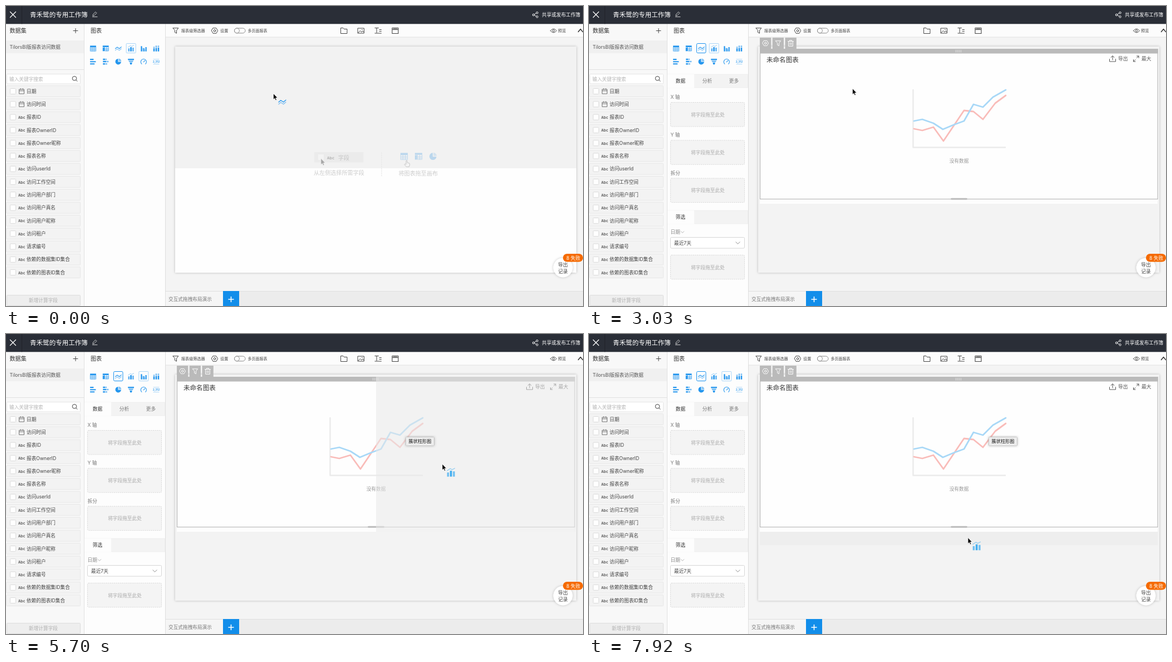
An HTML page for the animation above (8 s loop, 1037 by 540 pixels).

```html
<!DOCTYPE html>
<html lang="zh">
<head>
<meta charset="utf-8">
<title>拖拽布局演示</title>
<style>
html, body { margin: 0; width: 100%; height: 100%; overflow: hidden; background: #f4f4f4; }
svg { display: block; width: 100vw; height: 100vh; }
text { font-family: Inter, "Noto Sans CJK SC", "Noto Sans CJK", sans-serif; white-space: pre; }
.mono { font-family: "Noto Sans Mono", monospace; font-weight: 600; }
.line { fill: none; stroke: currentColor; stroke-linecap: round; stroke-linejoin: round; }
.blue { color: #2496ee; }
.pale { color: #84c1f2; }
</style>
</head>
<body>
<svg id="stage" viewBox="0 0 1037 540" preserveAspectRatio="none">
  <defs>
    <filter id="soft" x="-20%" y="-20%" width="140%" height="140%">
      <feDropShadow dx="0" dy="0" stdDeviation="2" flood-opacity=".25"/>
    </filter>
    <g id="table">
      <path fill="currentColor" d="M-6-5.5H6V-2H-6Z"/>
      <path class="line" stroke-width=".8" d="M-5.6-2V5.5H5.6V-2M-5.6 .5H5.6M-5.6 3H5.6M-2-2V5.5M2-2V5.5"/>
    </g>
    <g id="pivot">
      <path fill="currentColor" d="M-6-5.5H6V-2.6H-6ZM-6-1.8H-2.6V5.5H-6Z"/>
      <path class="line" stroke-width=".8" d="M-2-2V5.2H5.6V-2M-2 .5H5.6M-2 3H5.6M2-2V5.2"/>
    </g>
    <g id="waves">
      <path class="line" stroke-width="1.2" d="M-6 .5L-2.5-2.5 2 .5 6-3"/>
      <path class="line" stroke-width="1.2" opacity=".55" d="M-6 4L-2.5 1 2 4 6 .5"/>
    </g>
    <g id="combo">
      <path fill="currentColor" opacity=".75" d="M-5.6 0H-2.8V6H-5.6ZM2.8-1.5H5.6V6H2.8Z"/>
      <path fill="currentColor" d="M-1.5-2.5H1.5V6H-1.5Z"/>
      <path class="line" stroke-width=".9" opacity=".6" d="M-5.5-2.5L-1-5.5 1.5-4 5.5-6"/>
    </g>
    <g id="bars">
      <path fill="currentColor" d="M-5.5-4.5H-3V6H-5.5ZM-.8-.5H1.6V6H-.8ZM3.6-2.5H6V6H3.6Z"/>
      <path fill="currentColor" opacity=".5" d="M-3-1H-1.7V6H-3ZM1.6 2H2.8V6H1.6Z"/>
    </g>
    <g id="stack">
      <path fill="currentColor" d="M-5.8 0H-3V6H-5.8ZM-1.4-1H1.4V6H-1.4ZM3-1.5H5.8V6H3Z"/>
      <path fill="currentColor" opacity=".6" d="M-5.8-3.5H-3V-.7H-5.8ZM-1.4-5.5H1.4V-1.7H-1.4ZM3-5.5H5.8V-2.2H3Z"/>
    </g>
    <g id="rows">
      <path fill="currentColor" d="M-6-5.5H1V-3H-6ZM-6-.8H5.5V1.5H-6ZM-6 3.5H3V5.8H-6Z"/>
    </g>
    <g id="rowstack">
      <path fill="currentColor" d="M-5.5-5.8H-1V-3H-5.5ZM-5.5-1.3H1V1.3H-5.5ZM-5.5 3.2H-1.5V6H-5.5Z"/>
      <path fill="currentColor" opacity=".6" d="M-.4-5.8H2V-3H-.4ZM1.6-1.3H5.8V1.3H1.6ZM-.8 3.2H3V6H-.8Z"/>
    </g>
    <g id="pie">
      <path fill="currentColor" d="M-.5-5.6A5.8 5.8 0 1 0 5.6 .6H-.5Z"/>
      <path fill="currentColor" opacity=".55" d="M.6-6A6 6 0 0 1 6-.6H.6Z"/>
    </g>
    <g id="funnel">
      <path fill="currentColor" d="M-6-5.5H6V-3H-6ZM-2.5 2H2.5L1.5 5.8H-1.5Z"/>
      <path fill="currentColor" opacity=".6" d="M-5.2-2.2H5.2L3.4 1.2H-3.4Z"/>
    </g>
    <g id="gauge">
      <path class="line" stroke-width="1.2" d="M-3.8 4.8A5.6 5.6 0 1 1 3.8 4.8M0 1L2.5-2"/>
    </g>
    <g id="number">
      <path class="line" stroke-width=".7" opacity=".6" d="M-5.5-4.5H5.5M-5.5 5H5.5"/>
      <text y="2.4" font-size="5.4" font-weight="600" text-anchor="middle" fill="currentColor">2,312</text>
    </g>
    <path id="sieve" class="line" d="M-4.8-4.8H4.8L1.5-.5V4.6L-1.5 3V-.5Z"/>
    <g id="gear" class="line">
      <path d="M-2.8-4.8H2.8L5.6 0 2.8 4.8H-2.8L-5.6 0Z"/><circle r="1.9"/>
    </g>
    <path id="arrow" d="M0 0V11L2.5 8.7 4.1 12.4 5.9 11.6 4.3 8H7.6Z"/>
    <path id="down" class="line" d="M-3-1.5L0 1.5 3-1.5"/>
  </defs>
</svg>
<script>
const stage = document.getElementById('stage');
const S = 8.67, M = 10.1, L = 11.56, XS = 7.2;

const box = (x, y, w, h, fill, more = '') =>
  `<rect x="${x}" y="${y}" width="${w}" height="${h}" fill="${fill}" ${more}/>`;
const edge = (c, r = 0) => `stroke="${c}" rx="${r}"`;
const text = (x, cy, str, size, fill, more = '') =>
  `<text x="${x}" y="${cy + size * .37}" font-size="${size}" fill="${fill}" ${more}>${str}</text>`;
const mid = 'text-anchor="middle"';
const path = (d, c, w = 1, more = '') =>
  `<path class="line" d="${d}" style="color:${c}" stroke-width="${w}" ${more}/>`;
const use = (id, x, y, c = '', w = 1, k = 1) =>
  `<use href="#${id}" transform="translate(${x} ${y}) scale(${k})" style="color:${c}" stroke-width="${w}"/>`;
const group = (id, body, more = '') => `<g id="${id}" ${more}>${body}</g>`;

function header() {
  return box(0, 0, 1037, 32.3, '#2a2e37') + box(28, 0, 1, 32.3, '#20232a') +
    path('M7.5 10.5L17.5 20.5M17.5 10.5L7.5 20.5', '#fff', 1.3) +
    text(43, 15.8, '青禾鹭的专用工作簿', L, '#fff') +
    path('M156 17.5L156.6 14.8 161 10.6 163 12.6 158.7 16.9ZM155.5 19.5H164', '#ddd', .9) +
    path('M953.5 12.5L948.5 16 954 19', '#fff', .9) +
    [[954.5, 12.2], [948, 16], [954.5, 19.4]].map(([x, y]) =>
      `<circle cx="${x}" cy="${y}" r="1.7" fill="#2a2e37" stroke="#fff"/>`).join('') +
    text(963, 16, '共享或发布工作簿', S, '#fff');
}

function dataPanel() {
  const names = ['日期', '访问时间', '报表ID', '报表OwnerID', '报表Owner昵称', '报表名称', '访问userId',
    '访问工作空间', '访问用户部门', '访问用户真名', '访问用户昵称', '访问租户', '请求编号',
    '依赖的数据集ID集合', '依赖的图表ID集合'];
  const rows = names.map((name, i) => {
    const y = 153.5 + i * 23.29;
    const kind = i < 2
      ? path(`M24 ${y - 3.5}H32.5V${y + 4.5}H24ZM24 ${y - .8}H32.5M26.3 ${y - 5}V${y - 3}M30.2 ${y - 5}V${y - 3}`, '#666', .9)
      : text(22, y + .4, 'Abc', 7, '#666', 'class="mono"');
    return box(.5, y - 10, 133, 20, '#f3f3f3', edge('#e7e7e7', 1)) +
      box(7.5, y - 5, 10, 10, '#fff', edge('#dadada', 1)) + kind + text(37, y, name, S, '#444');
  }).join('');
  return box(0, 32, 140, 508, '#f8f8f8') + text(6.5, 44.5, '数据集', M, '#333') +
    path('M121 44.5H129M125 40.5V48.5', '#444') + box(0, 62, 140, 23, '#f0f0f0') +
    text(6.5, 73.5, 'TilorsBI版报表访问数据', S, '#555') + box(0, 114, 140, 1, '#e0e0e0') +
    box(1.5, 122.5, 132, 17.5, '#fff', edge('#e4e4e4', 1)) +
    text(6, 131.3, '输入关键字搜索', S, '#b5b5b5') +
    '<circle cx="123" cy="130.3" r="3.8" fill="none" stroke="#444"/>' + path('M126 133.3L128 135.5', '#444') +
    rows + box(1.5, 520.5, 132, 19, '#eee', edge('#dcdcdc', 1)) +
    text(67, 530, '新增计算字段', S, '#b0b0b0', mid);
}

function chartPanel() {
  const icons = ['table', 'pivot', 'waves', 'combo', 'bars', 'stack',
    'rows', 'rowstack', 'pie', 'funnel', 'gauge', 'number'];
  const cell = x => box(x - 8.5, 67.5, 17, 17, 'none', edge('#a9d5f8', 1));
  return box(140, 32, 147, 508, '#fdfdfd') + box(140, 32, 1, 508, '#e0e0e0') + box(286, 32, 1, 508, '#dedede') +
    text(152, 44.5, '图表', M, '#333') +
    `<g class="blue">${icons.map((id, i) =>
      use(id, 156.5 + i % 6 * 22.7, i < 6 ? 76.3 : 100, '', 1, .9)).join('')}</g>` +
    group('overCombo', cell(224.7)) + group('overBars', cell(247.3));
}

function settings() {
  const drop = y => box(146.5, y, 133, 43.5, '#f4f4f4', edge('#d6d6d6', 2) + ' stroke-dasharray="2 1.5"') +
    text(213.5, y + 22, '将字段拖至此处', S, '#aaa', mid);
  const strip = y => box(141, y, 145, 24, '#f3f3f3', 'stroke="#e8e8e8" stroke-width=".6"') +
    box(141, y, 48, 24.5, '#fdfdfd');
  return box(193.5, 67.5, 16.5, 17, 'none', edge('#1890ee', 2)) +
    strip(123) + text(164.5, 135, '数据', S, '#333', mid) + text(212.5, 135, '分析', S, '#777', mid) +
    text(260.5, 135, '更多', S, '#777', mid) +
    ['X 轴', 'Y 轴', '拆分'].map((s, i) => text(146.5, 163.7 + i * 68.4, s, S, '#777') + drop(173.5 + i * 68.3)).join('') +
    strip(368) + text(164.5, 380, '筛选', S, '#333', mid) +
    text(146.5, 406.7, '日期', S, '#888') + use('down', 168, 407, '#999', .8, .9) +
    box(146.5, 416.5, 133, 19.5, '#fff', edge('#d6d6d6', 2)) + text(153, 426.5, '最近7天', S, '#444') +
    use('down', 267.5, 426.5, '#777', .7, 1.2) + drop(448.3);
}

function toolbar() {
  const ink = '#444';
  return box(287, 32, 750, 24, '#fcfcfc') + box(287, 55.5, 750, 1, '#e4e4e4') +
    use('sieve', 305, 44.5, ink) + text(315, 44.5, '报表级筛选器', 7.1, ink) +
    use('gear', 375, 44.5, ink) + text(385, 44.5, '设置', XS, ink) +
    box(410.5, 40, 19.5, 8.8, '#fff', edge('#888', 4.4)) + '<circle cx="415" cy="44.4" r="4.4" fill="#fff" stroke="#888"/>' +
    text(434.5, 44.5, '多页面报表', 7, ink) +
    path('M602 39.5H606L607.5 41.5H613V49.5H602Z', ink) +
    path('M632.5 40H643.5V49H632.5ZM633 48L636.5 44.5 639 47 641 45 643.5 47.5M639.7 42.5H640.5', ink) +
    path('M663 39.5H669.5M666.2 39.5V48M671 42.5H674.5M671 45.5H674.5M663 49H674.5', ink) +
    path('M694 39.5H705V49.5H694ZM694 42.5H705', ink, 1.1) + path('M696 41H703', ink, 1.2) +
    path('M978.5 44.5Q984 37.5 989.5 44.5 984 51.5 978.5 44.5Z', ink, .9) +
    '<circle cx="984" cy="44.5" r="1.8" fill="none" stroke="#444" stroke-width=".9"/>' +
    text(992, 44.5, '预览', XS, ink) + path('M1028.5 46.5L1032.5 41.5 1036.5 46.5', '#333', 1.5);
}

function hints() {
  return box(304, 73, 721, 407, '#fefefe') +
    box(554, 263, 88.5, 18.5, '#efefef') + box(561, 267, 10, 10, '#fff') +
    text(577, 273, 'Abc', 7.5, '#777', 'class="mono"') + text(597, 273, '字段', M, '#999') +
    '<use href="#arrow" x="566" y="274.5" fill="#555" stroke="#fff" stroke-width=".6"/>' +
    text(553, 300, '从左侧选择所需字段', M, '#ccc') +
    path('M675 264V308', '#ddd', .8, 'stroke-dasharray="2 2"') +
    `<g class="pale">${['table', 'pivot', 'pie'].map((id, i) => use(id, 715.5 + i * 26, 270.5, '', 1, 1.1)).join('')}</g>` +
    '<path d="M719 285V278.5Q720 277 721 278.5V282L725 283Q726 284 725.5 286L724.5 289.5H719.5L716 285.5Q716 283.5 719 285Z" fill="#fff" stroke="#888" stroke-width=".8"/>' +
    text(705.5, 301, '将图表拖至画布', M, '#ccc');
}

function card() {
  const grey = '#bababa', ink = '#555';
  return box(304, 73, 721, 407, '#f3f3f3') + box(307, 77, 715, 279, '#fdfdfd') +
    [307, 329.7, 352.5].map(x => box(x, 57, 20.3, 20, grey)).join('') +
    use('gear', 317.2, 67, '#fff', 1, .95) + use('sieve', 340, 67.3, '#fff', 1, .95) +
    path('M357.5 63.5H367.5M360.5 63.5V61.8H364.5V63.5M358.7 63.5V72.3H366.3V63.5M361.3 66V70M363.8 66V70', '#fff') +
    box(307.5, 77.5, 714.5, 270, '#fefefe', 'stroke="#b0b0b0"') + box(307, 77, 715.5, 8.5, grey) +
    path('M659 80H671M659 82.5H671', '#eee', 1, 'stroke-dasharray="1 2"') +
    text(319, 97, '未命名图表', L, '#333') +
    path('M935.5 95.5V100H946.5V95.5M941 97V90M938 92.5L941 89.8 944 92.5', ink) +
    text(951, 94.7, '导出', S, ink) +
    path('M984.5 93.5L988 90M984.5 90H988V93.5M982 96.5L978.5 100M978.5 96.5V100H982', ink) +
    text(993, 94.7, '最大', S, ink) +
    path('M582.5 151V254.5H748', '#ebebeb', 2.6) +
    path('M584 221L599 224 619 218 637 243 674 188 691 190 708 204 730 175 749 161', '#f9bcb9', 2.8) +
    path('M584 207L599 204 619 211 636 222 655 214 674 207 691 177 708 182 726 164 749 151', '#a8d8f7', 2.8) +
    text(665, 278.7, '没有数据', S, '#999', mid) + box(650, 345.8, 30, 3, '#bbb', 'rx="1.5"');
}

function footer() {
  return box(287, 513, 750, 27, '#ececec') + box(287, 513, 750, 1, '#dfdfdf') +
    box(287, 514, 103, 26, '#f5f5f5') + text(292, 528, '交互式拖拽布局演示', S, '#777') +
    box(390, 513, 29, 27, '#128eea') + path('M400 528H409M404.5 523.5V532.5', '#fff', 1.6) +
    '<circle cx="1001" cy="471" r="17.3" fill="#fff" filter="url(#soft)"/>' +
    text(1001, 465.3, '导出', S, '#444', mid) + text(1001, 477.6, '记录', S, '#444', mid) +
    box(1001, 446, 36, 14.5, '#f56a00', 'rx="7.2"') + text(1019.5, 453.5, '8 失败', S, '#fff', mid);
}

stage.innerHTML += box(0, 0, 1037, 540, '#f4f4f4') +
  box(304, 73, 721, 407, '#f3f3f3', 'filter="url(#soft)"') +
  group('hints', hints()) + group('card', card()) +
  group('dashes', box(304.5, 73.5, 721, 407, 'none', 'stroke="#bbb" stroke-dasharray="2 1.5"')) +
  box(0, 0, 0, 0, 'rgba(234,234,234,.55)', 'id="zone"') + box(307, 356, 715, 24, '#eee', 'id="slot"') +
  toolbar() + dataPanel() + chartPanel() + group('settings', settings()) + header() + footer() +
  group('tip', box(718.5, 185.5, 51, 15.5, '#ededed', edge('#c6c6c6', 1) + ' filter="url(#soft)"') +
    text(744, 193.3, '簇状柱形图', 8.2, '#111', mid)) +
  group('pointer', group('dragLine', use('waves', 16, 15, '', 1, 1.08)) +
    group('dragBars', use('combo', 15.7, 15.2, '#45aff0', 1, 1.25)) +
    '<use href="#arrow" fill="#000" stroke="#fff" stroke-width=".8"/>', 'class="blue"');

const el = id => document.getElementById(id);
const show = (id, on) => el(id).style.display = on ? '' : 'none';

// Bursts of pointer updates: start, gap, count.
const ticks = [[0, 0, 1], [890, 0, 1], [1160, 150, 2], [1480, 170, 5], [2300, 146, 7], [3620, 146, 4],
  [4660, 150, 6], [5700, 148, 8], [6890, 145, 3], [7630, 145, 3]]
  .flatMap(([start, gap, n]) => Array.from({ length: n }, (_, i) => start + i * gap));

// Pointer route: time, x, y.
const route = [[0, 480.5, 157.5], [890, 461, 153], [1160, 436, 143], [1310, 420, 136], [2160, 330, 110],
  [2592, 228, 74], [2738, 247, 76], [2884, 350, 112], [3030, 473.5, 148.5], [3176, 510, 160],
  [3620, 555, 166], [4058, 717.7, 171], [4660, 717.7, 171], [5410, 770, 212], [5700, 784, 234],
  [5996, 790, 265], [6440, 686, 331.5], [6736, 685, 333], [7180, 684, 340], [7630, 683, 352], [7920, 681, 366.5]];

function locate(t) {
  const i = route.findIndex(p => p[0] > t);
  if (i < 0) return route[route.length - 1].slice(1);
  const [a, b] = [route[i - 1], route[i]], k = (t - a[0]) / (b[0] - a[0]);
  return [a[1] + (b[1] - a[1]) * k, a[2] + (b[2] - a[2]) * k];
}

// The half of the card whose edge is nearest to the pointer.
function dropZone(t, x, y) {
  if (t < 1310) return [304, 73, 721, 219];
  if (t < 3170 || y > 337) return [0, 0, 0, 0];
  const dx = (x - 664.5) / 715, dy = (y - 216) / 280;
  if (Math.abs(dx) > Math.abs(dy)) return [dx < 0 ? 307 : 665, 77, 358, 279];
  return dy < 0 ? [307, 77, 716, 139] : [307, 216, 716, 140];
}

function draw() {
  const now = performance.now() % 8000;
  const t = ticks.filter(v => v <= now).pop();
  const [x, y] = locate(t), made = t >= 1480, again = t >= 3170;
  el('pointer').setAttribute('transform', `translate(${x} ${y})`);
  dropZone(t, x, y).forEach((v, i) => el('zone').setAttribute(['x', 'y', 'width', 'height'][i], v));
  show('hints', !made);
  show('card', made);
  show('settings', made);
  show('dashes', t >= 1310 && !made);
  show('overCombo', t < 1310 || (t >= 2592 && !again));
  show('overBars', again);
  show('dragLine', t < 1310);
  show('dragBars', again);
  show('tip', t >= 4660);
  show('slot', y > 356);
  requestAnimationFrame(draw);
}
draw();
</script>
</body>
</html>
```
